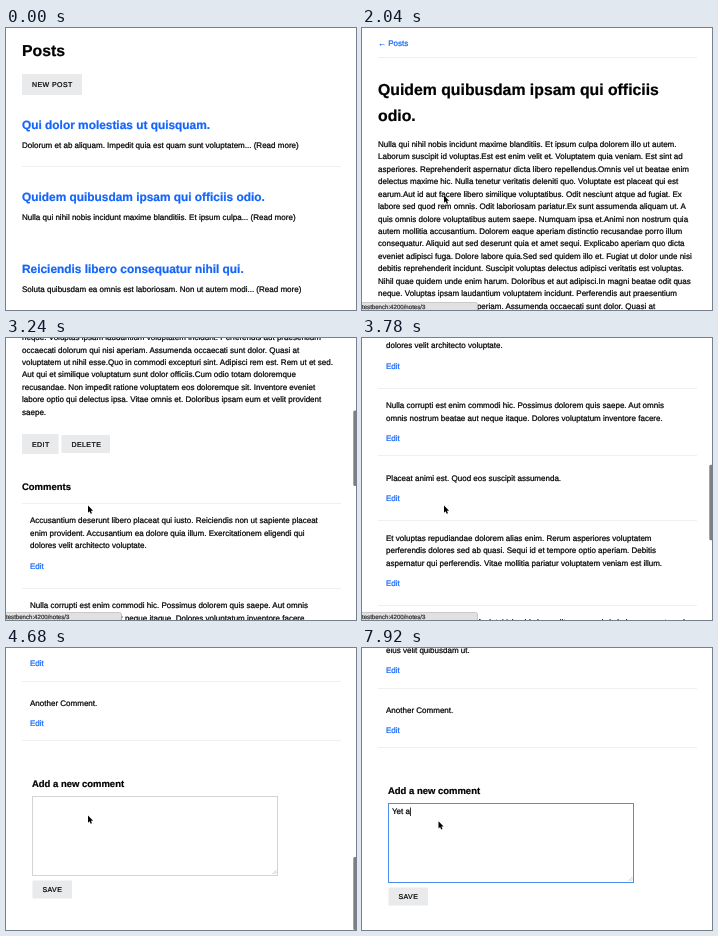
An HTML page that plays this animation: 350x282 px, repeating every 8 s.

```html
<!DOCTYPE html>
<html lang="en">
<head>
<meta charset="utf-8">
<title>Posts</title>
<style>
html, body { margin: 0; width: 350px; height: 282px; overflow: hidden; background: #fff; }
svg { display: block; }
text { font-family: "Liberation Sans", Arial, sans-serif; text-rendering: geometricPrecision; white-space: pre; stroke-width: .22px; }
</style>
</head>
<body>
<svg id="stage" width="350" height="282" viewBox="0 0 350 282"></svg>
<script>
const LOOP = 8000, STEP = 60, LEADING = 12.5, BODY = 8.03, BLUE = '#1264fb';
const stage = document.getElementById('stage');

function add(parent, tag, attrs = {}, content = '') {
  const el = document.createElementNS('http://www.w3.org/2000/svg', tag);
  for (const k in attrs) el.setAttribute(k, attrs[k]);
  el.textContent = content;
  parent.append(el);
  return el;
}
// y is the visual middle of the line; a thin outline makes the letters a little heavier
const text = (parent, x, y, str, size = BODY, fill = '#000', more = {}) =>
  add(parent, 'text', { x, y: y + size * .36, 'font-size': size, fill, stroke: fill, ...more }, str);
const bold = (parent, x, y, str, size, fill) =>
  text(parent, x, y, str, size, fill, { 'font-weight': 700 });
const link = (parent, x, y, str) => text(parent, x, y, str, BODY, BLUE);
const rule = (parent, y) =>
  add(parent, 'rect', { x: 16, y, width: 319, height: 1, fill: '#efefef' });
function button(parent, x, y, width, height, label) {
  add(parent, 'rect', { x, y, width, height, fill: '#e9eaeb' });
  text(parent, x + 9.9, y + height / 2, label, 7, '#000', { 'letter-spacing': .45 });
}

// List of posts
const list = add(stage, 'g');
bold(list, 16, 22, 'Posts', 15.8);
button(list, 16, 46, 60, 21, 'NEW POST');
[
  ['Qui dolor molestias ut quisquam.', 'Dolorum et ab aliquam. Impedit quia est quam sunt voluptatem'],
  ['Quidem quibusdam ipsam qui officiis odio.', 'Nulla qui nihil nobis incidunt maxime blanditiis. Et ipsum culpa'],
  ['Reiciendis libero consequatur nihil qui.', 'Soluta quibusdam ea omnis est laboriosam. Non ut autem modi']
].forEach(([title, intro], i) => {
  bold(list, 16, 96.5 + 72 * i, title, 11.88, BLUE);
  text(list, 16, 116.7 + 72 * i, intro + '... (Read more)');
});
rule(list, 138);

// Single post
const post = add(stage, 'g');
link(post, 16, 15, '← Posts');
rule(post, 29);
bold(post, 16, 61, 'Quidem quibusdam ipsam qui officiis', 15.8);
bold(post, 16, 87, 'odio.', 15.8);
`Nulla qui nihil nobis incidunt maxime blanditiis. Et ipsum culpa dolorem illo ut autem.
Laborum suscipit id voluptas.Est est enim velit et. Voluptatem quia veniam. Est sint ad
asperiores. Reprehenderit aspernatur dicta libero repellendus.Omnis vel ut beatae enim
delectus maxime hic. Nulla tenetur veritatis deleniti quo. Voluptate est placeat qui est
earum.Aut id aut facere libero similique voluptatibus. Odit nesciunt atque ad fugiat. Ex
labore sed quod rem omnis. Odit laboriosam pariatur.Ex sunt assumenda aliquam ut. A
quis omnis dolore voluptatibus autem saepe. Numquam ipsa et.Animi non nostrum quia
autem mollitia accusantium. Dolorem eaque aperiam distinctio recusandae porro illum
consequatur. Aliquid aut sed deserunt quia et amet sequi. Explicabo aperiam quo dicta
eveniet adipisci fuga. Dolore labore quia.Sed sed quidem illo et. Fugiat ut dolor unde nisi
debitis reprehenderit incidunt. Suscipit voluptas delectus adipisci veritatis est voluptas.
Nihil quae quidem unde enim harum. Doloribus et aut adipisci.In magni beatae odit quas
neque. Voluptas ipsam laudantium voluptatem incidunt. Perferendis aut praesentium
occaecati dolorum qui nisi aperiam. Assumenda occaecati sunt dolor. Quasi at
voluptatem ut nihil esse.Quo in commodi excepturi sint. Adipisci rem est. Rem ut et sed.
Aut qui et similique voluptatum sunt dolor officiis.Cum odio totam doloremque
recusandae. Non impedit ratione voluptatem eos doloremque sit. Inventore eveniet
labore optio qui delectus ipsa. Vitae omnis et. Doloribus ipsam eum et velit provident
saepe.`.split('\n').forEach((line, i) => text(post, 16, 116 + 12.44 * i, line));
button(post, 16, 362, 36.5, 20, 'EDIT');
button(post, 55.5, 363, 48.5, 18, 'DELETE');

// Comments
bold(post, 16, 414.5, 'Comments', 9.47);
rule(post, 431);
let y = 448.5;
[
  [516, 'Accusantium deserunt libero placeat qui iusto. Reiciendis non ut sapiente placeat',
    'enim provident. Accusantium ea dolore quia illum. Exercitationem eligendi qui',
    'dolores velit architecto voluptate.'],
  [583, 'Nulla corrupti est enim commodi hic. Possimus dolorem quis saepe. Aut omnis',
    'omnis nostrum beatae aut neque itaque. Dolores voluptatum inventore facere.'],
  [648, 'Placeat animi est. Quod eos suscipit assumenda.'],
  [733, 'Et voluptas repudiandae dolorem alias enim. Rerum asperiores voluptatem',
    'perferendis dolores sed ab quasi. Sequi id et tempore optio aperiam. Debitis',
    'aspernatur qui perferendis. Vitae mollitia pariatur voluptatem veniam est illum.'],
  [801, 'Accusamus deserunt eos fugiat. Vel nobis iure odit nam quod. Animi consequatur ad',
    'eius velit quibusdam ut.'],
  [860, 'Another Comment.']
].forEach(([ruleY, ...lines]) => {
  lines.forEach((line, i) => text(post, 24, y + LEADING * i, line));
  y += LEADING * (lines.length - 1);
  link(post, 24, y + 20.3, 'Edit');
  rule(post, ruleY);
  y += 59.9;
});

// Comment form
bold(post, 26, 904, 'Add a new comment', 9.47);
const box = add(post, 'rect', { x: 26.5, y: 916.5, width: 245, height: 79, fill: '#fff' });
add(post, 'path', { d: 'M266.5 994l4-4M268.7 994l1.8-1.8', stroke: '#aaa', 'stroke-width': .6 });
const typed = text(post, 30, 924.6, '');
const caret = add(post, 'rect', { y: 920.5, width: .8, height: 8.5 });
button(post, 26.5, 1000.5, 39.5, 18, 'SAVE');

// Browser chrome
const thumb = add(stage, 'rect', { x: 347.3, width: 5, rx: 1.5 });
const status = add(stage, 'g');
add(status, 'path', { d: 'M-1 274.5H113.5Q115.5 274.5 115.5 276.5V283H-1z', fill: '#e1e1e1', stroke: '#b9b9b9', 'stroke-width': .7 });
text(status, 0, 278.7, 'testbench:4200/notes/3', 6.1, '#333');
const cursor = add(stage, 'path', {
  d: 'M0 0V7.2L1.6 5.7L2.7 8.3L4 7.7L2.9 5.2H5.1z',
  stroke: '#fff', 'stroke-width': .7, 'paint-order': 'stroke'
});

// Each track is a list of [time, ...values], joined by straight lines
const scrollTrack = [[2820, 0], [2940, 50], [3060, 135], [3240, 266], [3420, 362], [3600, 430],
  [3720, 456], [3780, 466], [3900, 520], [4020, 588], [4200, 678], [4320, 722], [4440, 756],
  [4520, 768], [4620, 770], [4800, 765], [5000, 761]];
const cursorTrack = [[300, 156, 1], [480, 125, 70], [660, 98, 130], [780, 87, 157], [900, 82, 167.5],
  [4860, 82, 167.5], [5100, 76.5, 173.3]];
const keys = [[6780, 'Y'], [6960, 'Ye'], [7080, 'Yet'], [7200, 'Yet '], [7260, 'Yet a'], [7500, 'Yet an'], [7920, 'Yet a']];

const clamp = v => Math.max(0, Math.min(1, v));
function sample(track, t) {
  const i = track.findIndex(k => k[0] > t);
  if (i < 1) return track.at(i).slice(1);
  const [a, b] = [track[i - 1], track[i]];
  const p = (t - a[0]) / (b[0] - a[0]);
  return a.slice(1).map((v, n) => v + (b[n + 1] - v) * p);
}
const show = (el, on) => el.setAttribute('visibility', on ? 'visible' : 'hidden');

function draw(t) {
  const onPost = t >= 1860;
  list.setAttribute('display', onPost ? 'none' : 'inline');
  post.setAttribute('display', onPost ? 'inline' : 'none');

  const scroll = Math.round(sample(scrollTrack, t)[0]);
  post.setAttribute('transform', `translate(0 ${-scroll})`);
  const top = scroll * .2722;
  thumb.setAttribute('y', top);
  thumb.setAttribute('height', Math.min(75.5, 282 - top));
  thumb.setAttribute('fill-opacity', t < 2880 ? 0 : .5 * clamp((5940 - t) / 200));

  status.setAttribute('opacity', t < 3960 ? clamp((t - 1620) / 240) : 0);

  const [x, cy] = sample(cursorTrack, t);
  show(cursor, t >= 300);
  cursor.setAttribute('transform', `translate(${x} ${cy})`);

  const focused = t >= 5160;
  box.setAttribute('stroke', focused ? '#4a8cf0' : '#d4d4d4');
  const str = keys.filter(k => k[0] <= t).at(-1)?.[1] ?? '';
  typed.textContent = str;
  caret.setAttribute('x', 30 + (str ? typed.getComputedTextLength() : 0));
  show(caret, onPost && focused && (t < 5760 || t >= 6240));
}

const start = performance.now();
function frame() {
  const t = (performance.now() - start) % LOOP;
  draw(Math.floor(t / STEP) * STEP);
  requestAnimationFrame(frame);
}
frame();
</script>
</body>
</html>
```
